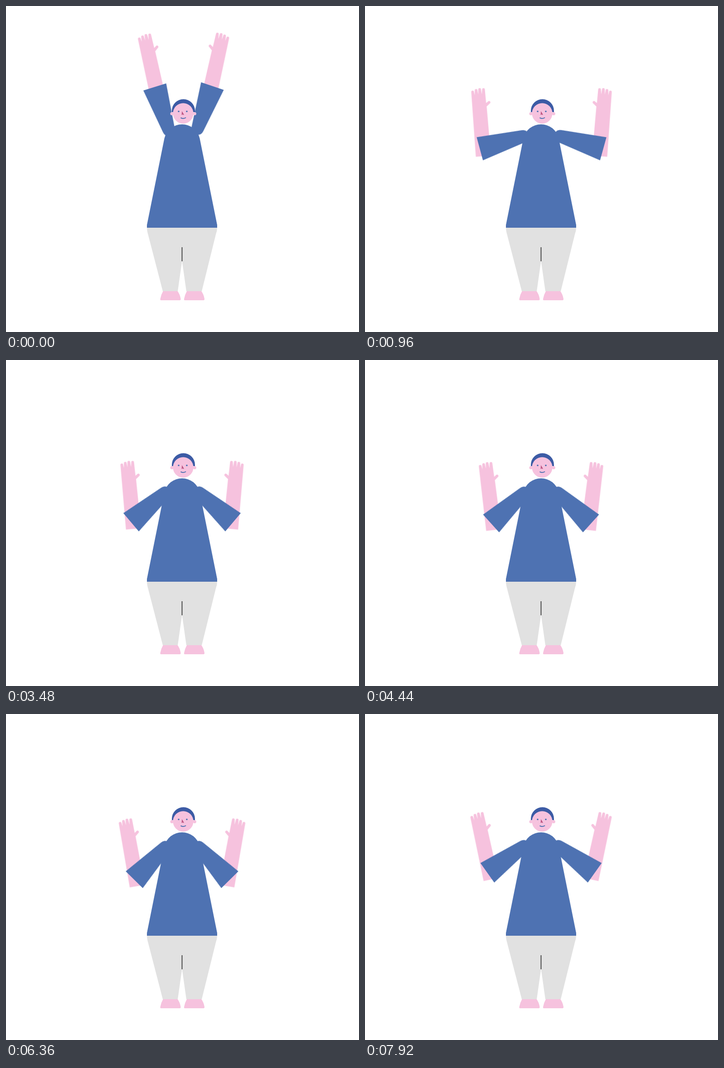
An HTML page that plays this animation: 779x719 px, repeating every 8000 ms.

```html
<!DOCTYPE html>
<html lang="en">
<head>
<meta charset="utf-8">
<title>Arm exercise</title>
<style>
  html, body { margin: 0; width: 100%; height: 100%; overflow: hidden; background: #fff; }
  svg { display: block; width: 779px; height: 719px; }

  .skin { fill: #f6c2de; }
  .shirt { fill: #4e72b2; }
  .hair { fill: #3c5ba5; }
  .trousers { fill: #e1e1e1; }
  .line { fill: none; stroke-width: 2; }

  /* The pose changes every 120 ms; the small lead keeps it clear of the step edges. */
  .arm, .forearm, .shrug { animation: 8s -10ms infinite; }
  .arm { --up: -17.2deg; animation-name: swing; }
  .forearm { --bend: 5.2deg; animation-name: bend; }
  .right .arm { --up: -18.4deg; }
  .right .forearm { --bend: 6.4deg; }
  .right .shrug { animation-name: shrug; }

  @keyframes swing {
    0% { transform: rotate(var(--up)); animation-timing-function: steps(10); }
    15%, 22.5% { transform: rotate(-127.2deg); animation-timing-function: steps(49); }
    96% { transform: rotate(-138deg); animation-timing-function: steps(1); }
    97.5% { transform: rotate(-136.4deg); animation-timing-function: steps(1); }
    99%, 100% { transform: rotate(-125.3deg); }
  }
  @keyframes bend {
    0% { transform: translate(2px, -99px) rotate(var(--bend)); animation-timing-function: steps(10); }
    15%, 22.5% { transform: translate(.8px, -105.5px) rotate(125.2deg); animation-timing-function: steps(49); }
    96% { transform: translate(.8px, -105.5px) rotate(126.1deg); animation-timing-function: steps(1); }
    97.5% { transform: translate(.8px, -105.5px) rotate(124.4deg); animation-timing-function: steps(1); }
    99%, 100% { transform: translate(.8px, -105.5px) rotate(113.6deg); }
  }
  @keyframes shrug {
    0% { transform: translate(-4.6px, -2.6px); animation-timing-function: steps(4); }
    6% { transform: translate(-4.2px, -2px); animation-timing-function: steps(4); }
    12% { transform: translate(-2.2px, -.4px); animation-timing-function: steps(2); }
    15%, 100% { transform: translate(0, 0); }
  }
</style>
</head>
<body>
<svg viewBox="0 0 779 719">
  <defs>
    <path id="hand" d="M-17.4 19.5 L-17.5 -123.5 a3 3 0 0 1 6 0 L-10.4 -116
      L-9.6 -126.5 a3 3 0 0 1 6 0 L-2.6 -117 L-1.6 -128 a3 3 0 0 1 6 0 L5.3 -117
      L6.8 -127.3 a3 3 0 0 1 6 0 L13.6 -97 L18.2 -100.5 a3 3 0 0 1 3.6 4.8
      L14.2 -89.5 L16 19.5 Z"/>
    <path id="sleeve" d="M-26.4 -112 H26.4 L15.2 -12 Q14.3 -3 6 0 H-4 Q-11 -2.5 -12.2 -11 Z"/>
    <path id="foot" d="M347 628 H378 Q384 636 385.5 646 Q386 649 383 649 H342 Q340 649 340.5 646 Q342 637 347 628 Z"/>
  </defs>

  <use href="#foot" class="skin"/>
  <use href="#foot" class="skin" x="52.5"/>
  <path class="trousers" d="M311 488 Q311 496 313 502 L346 629 H379 L388.5 562 L398 629 H432 L463.5 502 Q466 496 466 488 Z"/>
  <path class="line" stroke="#484848" d="M388.5 532 V563"/>

  <g class="left">
    <g class="shrug"><g transform="translate(361.4 285.5)"><g class="arm">
      <g class="forearm"><use href="#hand" class="skin"/></g>
      <use href="#sleeve" class="shirt"/>
    </g></g></g>
  </g>
  <g class="right" transform="translate(777 0) scale(-1 1)">
    <g class="shrug"><g transform="translate(361.4 285.5)"><g class="arm">
      <g class="forearm"><use href="#hand" class="skin"/></g>
      <use href="#sleeve" class="shirt"/>
    </g></g></g>
  </g>

  <path class="shirt" d="M311 489 V483 L349.5 292 A40 40 0 0 1 427.5 292 L466 483 V489 Z"/>

  <path class="hair" d="M366 234 V231 A25.5 25.5 0 0 1 417 231 V234 Z"/>
  <g class="skin">
    <circle cx="391" cy="236.8" r="22.6"/>
    <circle cx="366" cy="237.4" r="3.5"/>
    <circle cx="416.4" cy="237.4" r="3.5"/>
  </g>
  <circle class="shirt" cx="381" cy="232.5" r="1.8"/>
  <circle class="shirt" cx="399" cy="232.5" r="1.8"/>
  <path class="line" stroke="#bd5583" d="M388.5 240 L389 235 L392 240"/>
  <path class="line" stroke="#4e72b2" d="M385.5 246.3 Q391 250 397 246"/>
</svg>
</body>
</html>
```
